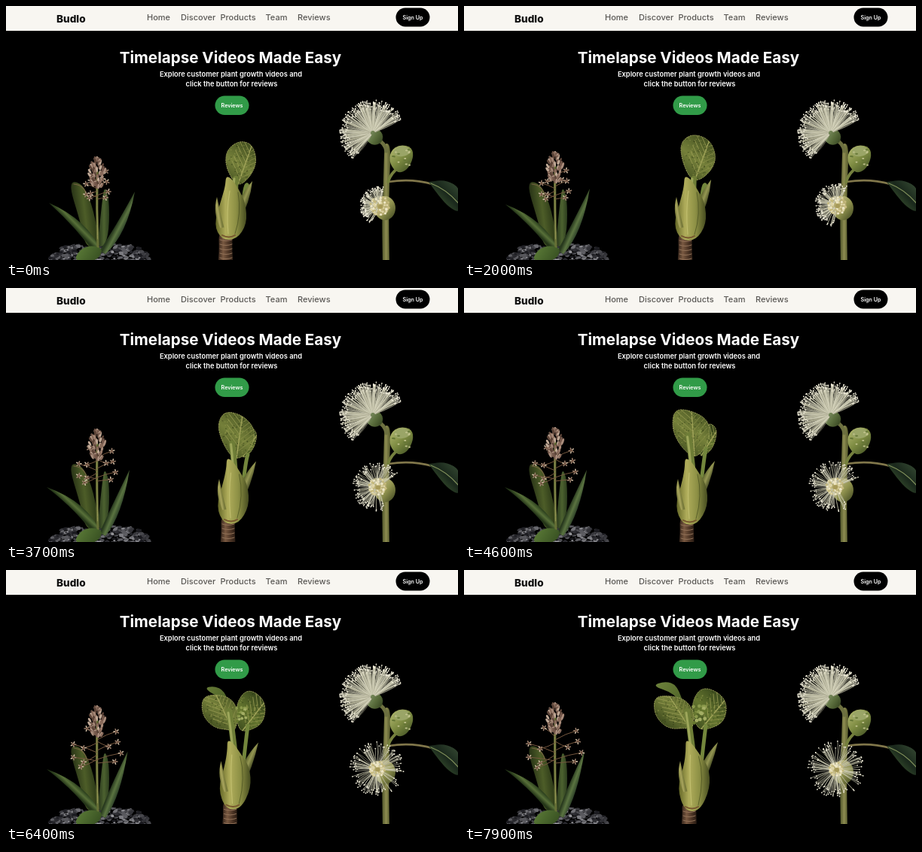
Animation, 600 px wide and 338 px high, one loop 8 s. Source, as an HTML page with a canvas:

```html
<!DOCTYPE html>
<html lang="en">
<head>
<meta charset="utf-8">
<title>Timelapse Videos Made Easy</title>
<style>
  html, body { margin: 0; width: 100%; height: 100%; overflow: hidden; background: #000; }
  canvas, svg { position: absolute; left: 0; top: 0; width: 600px; height: 338px; }
  text { font-family: Inter, Roboto, sans-serif; font-weight: 600; fill: #fff; }
  .nav text { font-size: 11px; font-weight: 500; fill: #5a5855; }
  .mid { text-anchor: middle; }
</style>
</head>
<body>
<canvas id="stage" width="600" height="338"></canvas>
<svg viewBox="0 0 600 338">
  <rect width="600" height="33" fill="#f8f6f1"/>
  <text x="67" y="22" style="font-size:13.6px;font-weight:800;fill:#111">Budlo</text>
  <g class="nav">
    <text x="187" y="19">Home</text>
    <text x="232" y="19">Discover</text>
    <text x="284.5" y="19">Products</text>
    <text x="344.5" y="19">Team</text>
    <text x="387" y="19">Reviews</text>
  </g>
  <rect x="517.5" y="2.5" width="45" height="25" rx="12.5"/>
  <g class="mid">
    <text x="540" y="17.6" font-size="7.2">Sign Up</text>
    <text x="298" y="76" style="font-size:20.6px;font-weight:700">Timelapse Videos Made Easy</text>
    <text x="298.5" y="94" font-size="9.3">Explore customer plant growth videos and</text>
    <text x="299.5" y="107" font-size="9.3">click the button for reviews</text>
    <rect x="277.5" y="119.5" width="45" height="25.5" rx="12.7" fill="#319b48"/>
    <text x="300" y="134.6" font-size="7.2">Reviews</text>
  </g>
</svg>
<script>
const c = document.getElementById('stage').getContext('2d');
const LOOP = 8000, STEP = 100;
const TIMES = [0, 2000, 2800, 4600, 5600, 7200, 7900];
let now = 0, seed = 1;

const rand = () => (seed = (seed * 16807) % 2147483647) / 2147483647;
const mix = (a, b, u) => a + (b - a) * u;

// Interpolates a value or an array of values between times.
function morph(times, values) {
  let i = 0;
  while (i < times.length - 2 && now >= times[i + 1]) i++;
  const u = Math.min(1, Math.max(0, (now - times[i]) / (times[i + 1] - times[i])));
  const a = values[i], b = values[i + 1];
  return Array.isArray(a) ? a.map((v, n) => mix(v, b[n], u)) : mix(a, b, u);
}
const key = (...values) => morph(TIMES, values);

function gradient(x0, y0, x1, y1, ...colors) {
  const g = c.createLinearGradient(x0, y0, x1, y1);
  colors.forEach((color, i) => g.addColorStop(i / (colors.length - 1), color));
  return g;
}

// Smooth closed outline; a repeated point makes a corner.
function shape(p, fill) {
  const n = p.length;
  c.beginPath();
  c.moveTo((p[n - 2] + p[0]) / 2, (p[n - 1] + p[1]) / 2);
  for (let i = 0; i < n; i += 2) {
    const x = p[(i + 2) % n], y = p[(i + 3) % n];
    c.quadraticCurveTo(p[i], p[i + 1], (p[i] + x) / 2, (p[i + 1] + y) / 2);
  }
  c.closePath();
  c.fillStyle = fill;
  c.fill();
}

function curve(x0, y0, cx, cy, x1, y1, width, color) {
  c.beginPath();
  c.moveTo(x0, y0);
  c.quadraticCurveTo(cx, cy, x1, y1);
  c.lineWidth = width;
  c.strokeStyle = color;
  c.stroke();
}
const line = (x0, y0, x1, y1, width, color) => curve(x0, y0, x0, y0, x1, y1, width, color);

function oval(x, y, rx, ry, fill, turn = 0) {
  c.beginPath();
  c.ellipse(x, y, rx, ry, turn, 0, 7);
  c.fillStyle = fill;
  c.fill();
}

function blade(x0, y0, cx, cy, x1, y1, w, ...colors) {
  const len = Math.hypot(x1 - x0, y1 - y0);
  const nx = -(y1 - y0) / len * w, ny = (x1 - x0) / len * w;
  const mx = (x0 + 2 * cx + x1) / 4, my = (y0 + 2 * cy + y1) / 4;
  c.beginPath();
  c.moveTo(x0 - nx / 2, y0 - ny / 2);
  c.quadraticCurveTo(cx - nx, cy - ny, x1, y1);
  c.quadraticCurveTo(cx + nx, cy + ny, x0 + nx / 2, y0 + ny / 2);
  c.fillStyle = gradient(mx - nx * .6, my - ny * .6, mx + nx * .6, my + ny * .6, ...colors);
  c.fill();
}

function gravel() {
  seed = 77;
  for (let i = 0; i < 330; i++) {
    const x = 59 + rand() * 131, edge = Math.abs((x - 125) / 69);
    const top = 317 + 21 * edge ** 5, y = mix(top, 340, rand());
    const r = 1.5 + rand() * 2.6, v = 25 + rand() ** 1.6 * 145 * (1 - edge * .35);
    const p = [];
    for (let a = 0; a < 5; a++) {
      const d = r * (.7 + rand() * .5), t = a * 1.257 + rand();
      p.push(x + d * Math.cos(t) * 1.2, y + d * Math.sin(t) * .8);
    }
    shape(p.concat(p.slice(-2)), `rgb(${v},${v},${v + 5})`);
  }
}

function floret(x, y, r) {
  for (let a = 0; a < 5; a++) {
    const t = a * 1.257 + x;
    line(x, y, x + r * Math.cos(t), y + r * Math.sin(t), 1.6, a % 2 ? '#cbb8a0' : '#9a7f6c');
  }
  oval(x, y, 1.3, 1.3, '#6d4c3a');
}

function spikePlant() {
  gravel();
  shape([91, 233, 104, 240, 116, 270, 125, 320, 106, 322, 99, 288, 87, 250, 86, 237],
    gradient(88, 280, 122, 276, '#222c13', '#4d5d28', '#243013'));
  curve(90, 237, 103, 238, 107, 251, 1.2, '#756442');
  shape([131, 240, 137, 256, 137, 298, 131, 320, 121, 320, 125, 285, 128, 256],
    gradient(122, 0, 138, 0, '#25331a', '#4d6230', '#28381c'));

  const tip = key(171, 167, 165, 163, 162, 161, 160), tipY = key(247, 243, 242, 242, 242, 241, 241);
  blade(128, 328, tip - 18, 299, tip, tipY, 9, '#28391e', '#5b7441', '#31452a');
  blade(123, 329, 102, 291, key(57, 55, 54, 54, 54, 54, 54), key(262, 264, 265, 265, 265, 265, 265),
    9, '#243518', '#587039', '#2b3f1d');
  shape([90, 340, 97, 325, 112, 318, 130, 323, 120, 340],
    gradient(95, 320, 125, 340, '#5c7c38', '#354d20'));

  const top = key(201, 194, 190, 186, 183, 179, 177);
  curve(122, 320, 120, 270, 121, top + 20, 3.2, '#667036');
  line(121.6, 310, 120.6, top + 30, 1, '#929254');

  const spread = key(.42, .52, .62, .77, .86, .95, 1);
  const ends = [[86, 231, 243], [149, 214, 226], [86, 249, 254], [156, 243, 252], [147, 255, 257],
    [97, 263, 252], [151, 228, 240], [101, 257, 246], [101, 238, 230], [106, 210, 222], [138, 236, 228]];
  for (const [x, y, from] of ends) {
    const px = mix(121, x, spread), py = mix(from - 2, y, spread);
    curve(121, from, mix(121, px, .5), mix(from, py, .7), px, py, 1, '#76583f');
    floret(px, py, 3.4);
  }

  seed = 19;
  const tones = ['#5b4337', '#8a6c5c', '#a98d7c', '#c1aa97', '#73574a'];
  for (let i = 0; i < 80; i++) {
    const u = i / 79, side = rand() * 2 - 1;
    const half = 10.5 * Math.sin(Math.min(1, u * 1.7 + .12) * 1.57) * (u > .6 ? 1.5 - u * .85 : 1);
    oval(121 + side * half, top + 2 + u * 37, 1.5, 3.4, tones[i * 3 % 5], side * .55);
  }
}

// Veined leaf with a pale toothed edge.
function budLeaf(p, light, dark) {
  const n = p.length;
  const bx = (p[0] + p[n - 2]) / 2, by = (p[1] + p[n - 1]) / 2;
  const m = Math.floor(n / 4) * 2, tx = p[m], ty = p[m + 1];
  shape(p, gradient(p[2], by, p[n - 4], ty, dark, light, dark));
  c.save();
  c.setLineDash([1.2, 1.6]);
  c.lineWidth = 1;
  c.strokeStyle = '#a1a55c';
  c.stroke();
  c.setLineDash([]);
  c.clip();
  line(bx, by, tx, ty, 1.4, '#a4a75c');
  for (let u = .15; u < 1; u += .13) {
    const x = mix(bx, tx, u), y = mix(by, ty, u);
    const dx = (tx - bx) * .32, dy = (ty - by) * .32;
    line(x, y, x + dx + dy, y + dy - dx, .8, '#9b9d55');
    line(x, y, x + dx - dy, y + dy + dx, .8, '#8b8f49');
  }
  seed = 5;
  for (let i = 0; i < 130; i++) {
    oval(mix(bx, tx, rand() * 1.3) + rand() * 50 - 25, mix(by, ty, rand() * 1.1) + rand() * 30 - 15,
      1, .8, i % 2 ? 'rgba(30,40,10,.4)' : 'rgba(160,165,85,.4)');
  }
  c.restore();
}

function budPlant() {
  const dx = key(0, 2, 2, 4, 5, 6, 7), low = key(308, 309, 310, 312, 314, 317, 318);
  const grown = [0, 2800, 4600, 5600, 7200];

  const right = morph(grown, [
    [312, 225, 318, 210, 322, 200, 325, 205, 322, 220, 316, 228],
    [312, 225, 318, 200, 326, 190, 331, 200, 327, 215, 316, 228],
    [312, 222, 316, 195, 325, 178, 337, 188, 331, 213, 318, 224],
    [308, 215, 308, 180, 325, 160, 341, 177, 338, 206, 318, 217],
    [308, 210, 301, 177, 317, 153, 349, 170, 347, 202, 322, 213]]);
  budLeaf(right, '#64752f', '#36451b');

  const stalk = key(0, 0, .3, .8, 1, 1, 1);
  curve(314, 268, 318, 230, 321, mix(240, 207, stalk), 5, '#73863c');

  if (now > 4600) {
    shape(morph([4600, 5600, 7200, 7900], [
      [285, 167, 292, 166, 300, 172, 302, 180, 292, 178],
      [270, 159, 282, 159, 296, 167, 302, 183, 289, 176],
      [255, 156, 269, 149, 284, 154, 294, 186, 280, 165],
      [249, 154, 267, 148, 283, 153, 294, 186, 279, 164]]),
      gradient(256, 152, 294, 180, '#6d823b', '#4b5f25'));
  }

  const left = morph(grown, [
    [303, 236, 291, 212, 293, 191, 310, 179, 327, 184, 333, 205, 327, 223, 313, 238],
    [299, 228, 288, 201, 285, 177, 301, 166, 326, 175, 336, 198, 330, 216, 313, 230],
    [300, 223, 285, 207, 276, 186, 279, 161, 302, 163, 325, 176, 326, 201, 312, 224],
    [298, 216, 280, 208, 267, 191, 269, 169, 285, 164, 305, 169, 312, 190, 306, 215],
    [297, 210, 271, 212, 253, 194, 252, 169, 272, 167, 294, 172, 306, 190, 303, 213]]);
  budLeaf(left, '#75803a', '#3f4c1e');

  curve(304 + dx * .3, 275, 304, 235, mix(305, 296, stalk), mix(230, 188, stalk), 8, '#6e7d37');
  curve(302 + dx * .3, 275, 302, 235, mix(303, 295, stalk), mix(230, 190, stalk), 3, '#9da65a');

  const beads = key(0, 0, 0, .25, .6, 1, 1);
  if (beads) {
    seed = 31;
    for (let i = 0; i < 24; i++) {
      oval(313 + (rand() - .5) * 17 * beads, 192 + (rand() - .5) * 24 * beads,
        2.4 * beads, 2.4 * beads, ['#8b9a4c', '#66772f', '#a4ae65'][i % 3]);
    }
  }

  shape([282 + dx, low - 8, 301 + dx, low - 8, 300 + dx * 1.2, 325, 302 + dx, 345, 281 + dx, 345, 283 + dx, 325],
    gradient(281 + dx, 0, 303 + dx, 0, '#2b1d15', '#795941', '#4a3324', '#21160f'));
  for (let y = low + 3; y < 338; y += 6) curve(284 + dx, y, 292 + dx, y + 3, 300 + dx, y, 1, '#94745a');

  const tip = key(327, 328, 331, 333, 334, 336, 337), tipY = key(233, 231, 231, 230, 230, 229, 229);
  blade(304 + dx, 288, 316 + dx * .7, 258, tip, tipY, 9, '#585e2b', '#959753', '#4d5228');
  shape([292 + dx * .3, 226, 300 + dx * .3, 230, 309 + dx * .4, 244, 318 + dx, 262, 320 + dx, 290,
    306 + dx, low + 3, 286 + dx, low + 3, 276 + dx, 291, 285 + dx, 260, 291 + dx * .5, 240],
    gradient(278 + dx, 0, 319 + dx, 0, '#636626', '#b0ad5b', '#8d9045', '#464c20'));
  blade(287 + dx, 295, 279 + dx, 275, 280 + dx, 254, 5, '#77793a', '#aaa65e', '#77793a');
  curve(297 + dx * .5, 246, 292 + dx, 274, 295 + dx, low - 5, 1.2, 'rgba(202,199,120,.7)');
  curve(308 + dx * .5, 248, 313 + dx, 276, 304 + dx, low - 5, 1, 'rgba(70,77,30,.7)');
  curve(287 + dx, low - 3, 296 + dx, low + 2, 304 + dx, low - 3, 2, '#77572f');
}

function filaments(count, x, y, mid, half, reach, core) {
  for (let i = 0; i < count; i++) {
    const a = mid + (rand() * 2 - 1) * half, d = reach * (.72 + rand() * .28);
    const ca = Math.cos(a), sa = Math.sin(a), bend = (rand() - .5) * 6;
    const ex = x + d * ca, ey = y + d * sa;
    curve(x + core * ca, y + core * sa, x + d * .6 * ca - bend * sa, y + d * .6 * sa + bend * ca,
      ex, ey, .6, i % 3 ? '#d6d3bd' : '#a7a48b');
    oval(ex, ey, .85, .85, '#f1eddb');
  }
}

function bloomPlant() {
  curve(508, 234, 538, 229, 566, 237, 2.6, '#80764a');
  shape([561, 234, 561, 234, 584, 231, 604, 243, 604, 276, 588, 268, 574, 252],
    gradient(570, 260, 596, 236, '#38502e', '#1a281c', '#31442f'));
  curve(564, 236, 585, 244, 601, 263, 1.2, '#81915b');

  shape([500, 345, 500, 345, 499, 280, 501, 235, 502, 192, 504, 181, 511, 187, 509, 232, 508, 280, 509, 345, 509, 345],
    gradient(499, 0, 510, 0, '#4d5328', '#8c8b50', '#55592c'));
  curve(505, 193, 503, 182, 492, 177, 5, '#6d7040');
  curve(507, 234, 511, 222, 523, 213, 4, '#75803e');
  shape([510, 193, 523, 184, 539, 188, 541, 202, 533, 218, 520, 223, 509, 210],
    gradient(513, 190, 537, 216, '#abb26a', '#7d8b42', '#4a5928'));
  shape([513, 193, 524, 185, 538, 190, 534, 199, 519, 201], '#9aa567');
  seed = 41;
  for (let i = 0; i < 16; i++) {
    oval(514 + rand() * 22, 191 + rand() * 23, 1.2 + rand(), 1, i % 2 ? '#c0c28c' : '#667737');
  }

  oval(489, 174, 11.5, 10.5, gradient(480, 170, 499, 182, '#7e9064', '#5b6e3d', '#394823'), .4);
  seed = 8;
  filaments(330, 487, 169, -2.27, 1.82, 44, 4);

  const x = key(496, 495, 494, 492, 492, 493, 494), y = key(266, 265, 265, 264, 264, 265, 265);
  const open = key(1.45, 1.75, 2, 2.5, 2.85, 3.14, 3.14);
  const disk = key(13, 12.5, 12, 11.5, 11, 10, 9.5);
  oval(503, 269, 14, 16, gradient(493, 260, 517, 280, '#c2bc82', '#8f914e', '#484f25'));
  oval(x, y, disk, disk, '#b5ab70');
  seed = 61;
  filaments(130, x, y, 3.5, open, key(26, 29, 31, 34, 35, 37, 37.5), 5);
  for (let i = 0; i < 65; i++) {
    const a = rand() * 6.28, d = Math.sqrt(rand()) * disk;
    oval(x + d * Math.cos(a), y + d * Math.sin(a), 1.5, 1.5, ['#ddd3a4', '#c5b97c', '#eee7c7'][i % 3]);
  }
  oval(x + 1, y + 1, 3, 3, '#a79a58');
}

function draw(time) {
  now = Math.floor(time / STEP) * STEP % LOOP;
  c.clearRect(0, 0, 600, 338);
  c.lineCap = 'round';
  spikePlant();
  budPlant();
  bloomPlant();
  requestAnimationFrame(draw);
}
draw(0);
</script>
</body>
</html>
```
